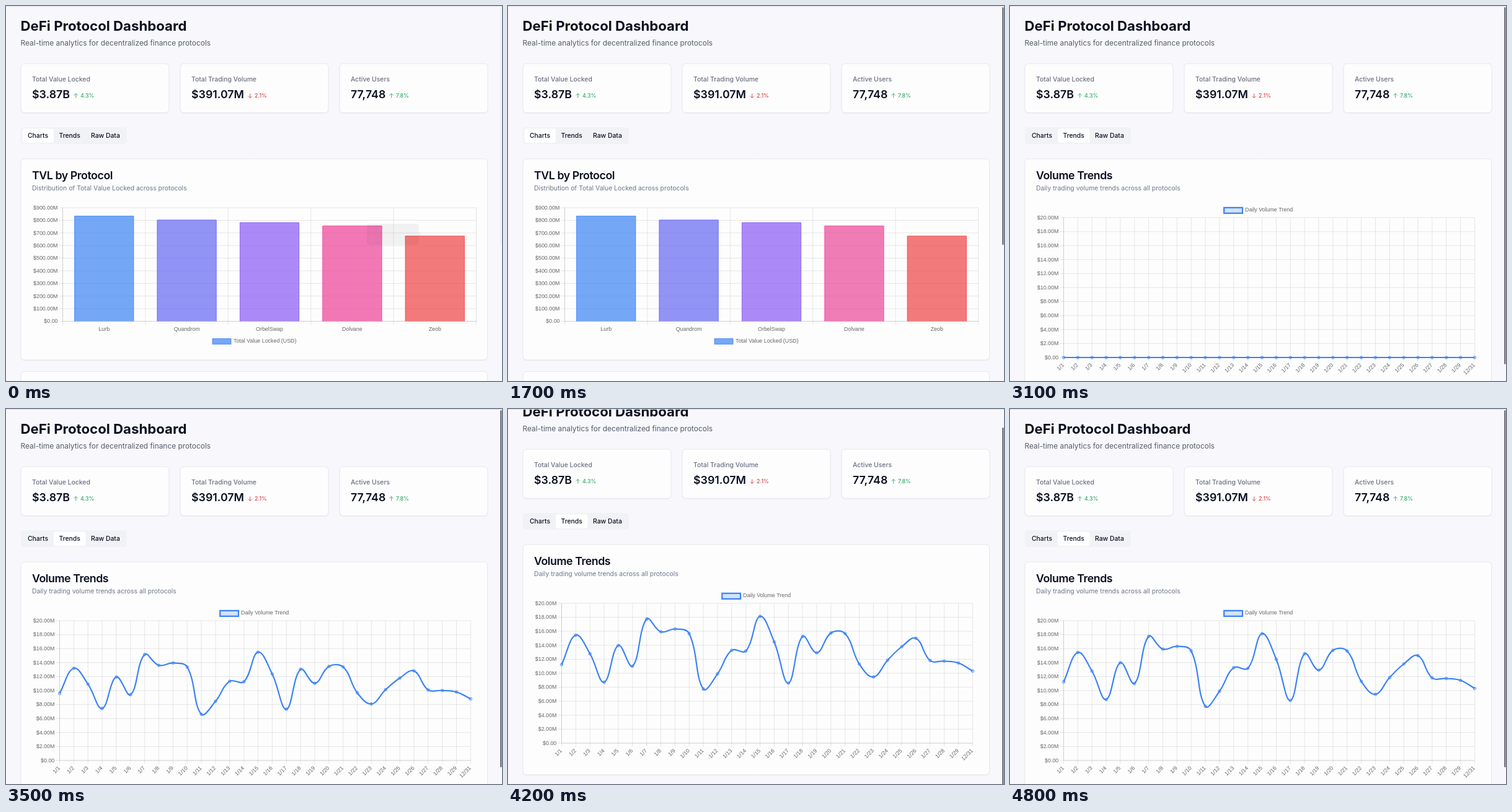
Write an HTML page with a canvas that moves like this. It is 800 by 606 pixels and loops after 5200 ms.

```html
<!DOCTYPE html>
<html lang="en">
<head>
<meta charset="utf-8">
<title>DeFi Protocol Dashboard</title>
<style>
  html, body { margin: 0; height: 100%; overflow: hidden; background: #f8f8fc; }
  canvas { display: block; }
</style>
</head>
<body>
<canvas id="stage" width="800" height="606"></canvas>
<script>
const ctx = document.getElementById('stage').getContext('2d');
const LOOP = 5200, STEP = 100;
const UI = 'Inter, sans-serif', CHART = '"Liberation Sans", Arial, sans-serif';
const INK = '#0b1020', MUTED = '#6b7080', GRID = 'rgba(0,0,0,.095)', BLUE = '#3b82f6';

const clamp = v => Math.max(0, Math.min(1, v));
const easeOut = p => 1 - (1 - clamp(p)) ** 4;
const smooth = p => (p = clamp(p), p * p * (3 - 2 * p));
const money = v => '$' + v.toFixed(2) + 'M';

function text(str, x, y, font, color, { align = 'left', spacing = 0, baseline = 'alphabetic' } = {}) {
  ctx.font = font;
  ctx.fillStyle = color;
  ctx.textAlign = align;
  ctx.textBaseline = baseline;
  ctx.letterSpacing = spacing + 'px';
  ctx.fillText(str, x, y);
}
const label = (str, x, y, align) => text(str, x, y, '8.9px ' + CHART, '#666', { align });

function box(x, y, w, h, r, fill, stroke, lineWidth = 1) {
  ctx.beginPath();
  ctx.roundRect(x, y, w, h, r);
  if (fill) { ctx.fillStyle = fill; ctx.fill(); }
  if (stroke) { ctx.strokeStyle = stroke; ctx.lineWidth = lineWidth; ctx.stroke(); }
}

function line(color, width, ...xy) {
  ctx.beginPath();
  for (let i = 0; i < xy.length; i += 2) ctx.lineTo(xy[i], xy[i + 1]);
  ctx.strokeStyle = color;
  ctx.lineWidth = width;
  ctx.stroke();
}

function card(x, y, w, h) {
  ctx.save();
  ctx.shadowColor = 'rgba(0,0,0,.07)';
  ctx.shadowBlur = 2;
  ctx.shadowOffsetY = 1;
  box(x, y, w, h, 6, '#fdfdfe');
  ctx.restore();
  box(x, y, w, h, 6, null, '#e5e7ec');
}

function chartCard(title, subtitle, height) {
  card(24, 247, 752.5, height);
  text(title, 42, 280, '600 17.8px ' + UI, INK, { spacing: -0.445 });
  text(subtitle, 42, 297.5, '10.4px ' + UI, '#6b7589');
}

function stat(x, name, value, change, up, changeX) {
  card(x, 93, 239, 79.5);
  text(name, x + 18, 121.5, '500 10.4px ' + UI, MUTED);
  text(value, x + 18, 149.3, '600 17.8px ' + UI, INK);
  const color = up ? '#35a866' : '#dc4444';
  const tip = up ? 141.5 : 148.5, dir = up ? 1 : -1, cx = changeX + 3.7;
  line(color, 0.9, cx, tip, cx, tip + 7 * dir);
  line(color, 0.9, cx - 3, tip + 3 * dir, cx, tip, cx + 3, tip + 3 * dir);
  text(change, changeX + 11, 148.2, '500 8.9px ' + UI, color);
}

function header(trends) {
  text('DeFi Protocol Dashboard', 23.6, 40, '700 22.2px ' + UI, INK);
  text('Real-time analytics for decentralized finance protocols', 23.6, 64, '11.88px ' + UI, '#555c69');
  stat(24, 'Total Value Locked', '$3.87B', '4.3%', true, 109);
  stat(281, 'Total Trading Volume', '$391.07M', '2.1%', false, 390);
  stat(538, 'Active Users', '77,748', '7.8%', true, 618);
  box(24, 196, 171, 27, 4.5, '#f1f2f6');
  const pill = (x, w, alpha) => box(x, 198.3, w, 22.8, 3, `rgba(254,254,254,${alpha})`);
  pill(26.5, 50.5, trends < 1 ? 1 : 0);
  pill(77, 51.5, trends);
  [['Charts', 35], ['Trends', 85.5], ['Raw Data', 137]].forEach(([name, x]) =>
    text(name, x, 213.3, '500 10.4px ' + UI, INK));
}

// Bar chart: name, value in millions, hue, saturation, lightness
const BARS = [
  ['Lurb', 836.12, 217, 91, 60],
  ['Quandrom', 804.37, 239, 84, 67],
  ['OrbelSwap', 783.59, 258, 90, 66],
  ['Dolvane', 758.26, 330, 81, 60],
  ['Zeob', 677.41, 0, 84, 60],
];
const LEFT = 91.5, SLOT = 133.4, FLOOR = 509.5, PER_M = 183.5 / 900;
const barX = i => LEFT + SLOT * (i + 0.5);
const barTop = i => FLOOR - BARS[i][1] * PER_M;
const barColor = ([, , h, s, l], hover, alpha) =>
  `hsla(${h},${s + (100 - s) * hover}%,${l * (1 - 0.1 * hover)}%,${alpha})`;

// Pointer visits: time and hovered bar (-1 is none)
const VISITS = [[-320, 3], [-155, 4], [-154, -1], [200, 3], [330, 2], [680, 1], [830, -1]];

function tipTarget(i) {
  ctx.font = '8.9px ' + CHART;
  ctx.letterSpacing = '0px';
  const body = BARS[i][0] + ': ' + money(BARS[i][1]);
  const w = ctx.measureText(body).width + 19.3;
  const x = i <= 2 ? barX(i) + 5.2 : barX(i) - 5.2 - w;
  return { i, body, w, x, y: barTop(i) - 17 };
}

function hoverState(t) {
  const hover = BARS.map(() => 0);
  let tip = tipTarget(3), { x, y } = tip, alpha = 0;
  VISITS.forEach(([start, bar], n) => {
    if (start > t) return;
    const span = Math.min(t, n + 1 < VISITS.length ? VISITS[n + 1][0] : t) - start;
    const p = easeOut(span / 400);
    if (bar >= 0) tip = tipTarget(bar);
    x += (tip.x - x) * p;
    y += (tip.y - y) * p;
    alpha = clamp(alpha + (bar >= 0 ? span : -span) / 200);
    hover.forEach((k, i) => hover[i] += ((i === bar) - k) * p);
  });
  return { hover, tip, x, y, alpha };
}

function tooltip({ tip, x, y, alpha }) {
  if (alpha <= 0) return;
  const bar = BARS[tip.i], mid = y + 17, fill = 'rgba(0,0,0,.8)';
  ctx.save();
  ctx.globalAlpha = alpha;
  box(x, y, tip.w, 34, 4.5, fill);
  const edge = tip.i <= 2 ? x : x + tip.w, out = tip.i <= 2 ? -3.7 : 3.7;
  ctx.beginPath();
  ctx.moveTo(edge, mid - 3.7);
  ctx.lineTo(edge + out, mid);
  ctx.lineTo(edge, mid + 3.7);
  ctx.fill();
  text(bar[0], x + 4.5, y + 11.6, 'bold 8.9px ' + CHART, '#fff');
  box(x + 4.5, y + 19.8, 8.9, 8.9, 0, '#fff');
  box(x + 5.2, y + 20.5, 7.5, 7.5, 0, barColor(bar, 1, 0.7));
  text(tip.body, x + 14.9, y + 27.2, '8.9px ' + CHART, '#fff');
  ctx.restore();
}

function barsView(t) {
  chartCard('TVL by Protocol', 'Distribution of Total Value Locked across protocols', 325);
  for (let k = 0; k <= 9; k++) {
    const y = FLOOR - k * 100 * PER_M;
    line(GRID, 1, LEFT - 6, y, LEFT + SLOT * 5, y);
    label(money(k * 100).replace(/^\$0.00M$/, '$0.00'), 83.5, y + 2.8, 'right');
  }
  for (let k = 0; k <= 5; k++) line(GRID, 1, LEFT + k * SLOT, 326, LEFT + k * SLOT, 515.5);
  line(GRID, 1, LEFT, 326, LEFT, FLOOR, LEFT + SLOT * 5, FLOOR);

  const state = hoverState(t);
  BARS.forEach((bar, i) => {
    const x = barX(i) - 48, top = barTop(i), k = state.hover[i];
    box(x, top, 96, FLOOR - top, 0, barColor(bar, k, 0.7));
    line(barColor(bar, k, 0.85), 0.8, x + 0.4, FLOOR, x + 0.4, top + 0.4, x + 95.6, top + 0.4, x + 95.6, FLOOR);
    label(bar[0], barX(i), 524.8, 'center');
  });
  box(333, 537.5, 30, 9, 0, barColor(BARS[0], 0, 0.7), BLUE, 0.8);
  label('Total Value Locked (USD)', 367, 544.2);
  card(24, 590.5, 752.5, 60);
  tooltip(state);
}

// Line chart: daily volume as heights above the zero line
const VOLUME = [127, 174.5, 144.5, 98.5, 158, 124.5, 200.5, 180, 184.5, 177, 87.5, 112, 150, 149, 205,
  163.5, 97, 172.5, 146, 178, 177, 128, 107, 134, 156, 169.5, 133.5, 132.5, 129.5, 116.5];
const ZERO = 568, GAP = 22.86;
const points = VOLUME.map((v, i) => ({ x: 86.5 + i * GAP, v }));

// Control points of a cardinal spline with tension 0.4
points.forEach((p, i) => {
  const a = points[i - 1] || p, b = points[i + 1] || p;
  const d1 = Math.hypot(p.x - a.x, p.v - a.v), d2 = Math.hypot(b.x - p.x, b.v - p.v);
  const f1 = 0.4 * d1 / (d1 + d2), f2 = 0.4 * d2 / (d1 + d2);
  p.in = { x: p.x - f1 * (b.x - a.x), v: p.v - f1 * (b.v - a.v) };
  p.out = { x: p.x + f2 * (b.x - a.x), v: p.v + f2 * (b.v - a.v) };
});

function trendView(t) {
  chartCard('Volume Trends', 'Daily trading volume trends across all protocols', 372);
  box(345.2, 325.8, 29.8, 9, 0, 'rgba(59,130,246,.22)', BLUE, 2.2);
  label('Daily Volume Trend', 379, 332.4);
  for (let k = 0; k <= 10; k++) {
    const y = ZERO - k * 22.6;
    line(GRID, 1, 80.5, y, 749.5, y);
    label(k ? money(k * 2) : '$0.00', 78.3, y + 2.8, 'right');
  }
  points.forEach(({ x }, i) => {
    line(GRID, 1, x, 342, x, 573.5);
    ctx.save();
    ctx.translate(x - 0.6, 579);
    ctx.rotate(-Math.PI / 4);
    text(i < 29 ? '1/' + (i + 1) : '12/31', 0, 0, '8.9px ' + CHART, '#666', { align: 'right', baseline: 'middle' });
    ctx.restore();
  });
  line(GRID, 1, 86.5, 342, 86.5, ZERO, 749.5, ZERO);

  const grow = easeOut((t - 3118) / 1000);
  const y = p => ZERO - p.v * grow;
  ctx.beginPath();
  points.forEach((p, i) => {
    const a = points[i - 1];
    if (a) ctx.bezierCurveTo(a.out.x, y(a.out), p.in.x, y(p.in), p.x, y(p));
    else ctx.moveTo(p.x, y(p));
  });
  ctx.strokeStyle = BLUE;
  ctx.lineWidth = 2.2;
  ctx.stroke();
  points.forEach(p => box(p.x - 2.2, y(p) - 2.2, 4.4, 4.4, 2.2, 'rgba(59,130,246,.2)', BLUE, 0.8));
}

function draw(now) {
  const t = Math.floor(now % LOOP / STEP) * STEP;
  const trends = t >= 3100;
  const scroll = 28 * (smooth((t - 3650) / 500) - smooth((t - 4430) / 370));
  ctx.fillStyle = '#f8f8fc';
  ctx.fillRect(0, 0, 800, 606);
  ctx.save();
  ctx.translate(0, -scroll);
  header(trends ? 1 : 0.5 * clamp((t - 2000) / 300));
  (trends ? trendView : barsView)(t);
  ctx.restore();
  ctx.fillStyle = '#dddde1';
  ctx.fillRect(0, 0, 800, 1);
  const alpha = 0.05 + 0.95 * clamp(t / 300);
  box(797, 2 + scroll, 2.6, trends ? 577 : 384, 1.3, `rgba(118,118,122,${alpha})`);
  requestAnimationFrame(tick);
}

const begin = performance.now();
function tick() { draw(performance.now() - begin); }
tick();
</script>
</body>
</html>
```
